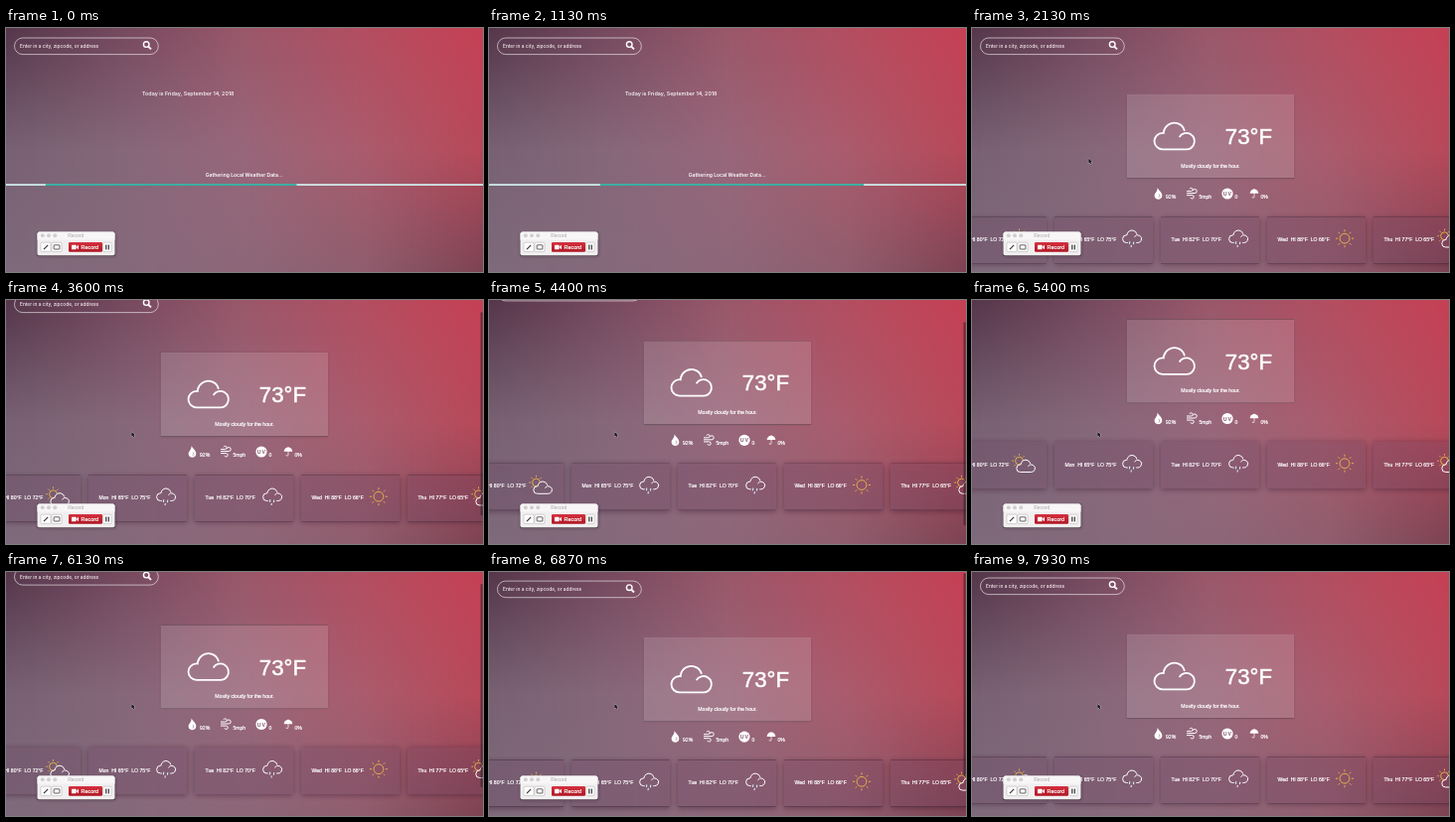
An HTML page with a canvas for the animation above (8 s loop, 480 by 246 pixels).

```html
<!DOCTYPE html>
<html lang="en">
<head>
<meta charset="utf-8">
<title>Local weather</title>
<style>
  html, body { margin: 0; width: 100%; height: 100%; overflow: hidden; background: #7b5a6c; }
  canvas { display: block; width: 480px; height: 246px; }
</style>
</head>
<body>
<canvas id="stage"></canvas>
<script>
const W = 480, H = 246, LOOP = 8000, LOADED = 1330;
const SANS = '"Liberation Sans", Arial, sans-serif';
const INTER = 'Inter, sans-serif';
const canvas = document.getElementById('stage');
const c = canvas.getContext('2d');
const dpr = window.devicePixelRatio || 1;
canvas.width = W * dpr;
canvas.height = H * dpr;

const days = [
  ['Sun', 80, 72, 'partly'],
  ['Mon', 65, 75, 'rain'],
  ['Tue', 82, 70, 'rain'],
  ['Wed', 88, 66, 'sun'],
  ['Thu', 77, 65, 'partly']
];

// backdrop colours from left to right, at the top, middle and bottom
const ramps = [
  ['#55364b', '#76495e', '#9a576a', '#b34d60', '#c64054'],
  ['#776173', '#86677a', '#98667a', '#aa5b6c', '#b74859'],
  ['#7d6a7b', '#85697b', '#8c6778', '#8f5d6e', '#7c4353']
];

// time, page scroll
const scrollKeys = [[0, 0], [2470, 0], [3200, 13], [3600, 14], [4130, 25], [4400, 25.7], [4800, 47.5],
  [5440, 47.5], [6130, 13.5], [6640, 0.8], [6800, 0.8], [7500, 4], [LOOP, 4]];
const barKeys = [[0, 0], [2470, 0], [2600, 1], [5100, 1], [5320, 0], [5430, 0], [5500, 1], [7640, 1], [7900, 0], [LOOP, 0]];

const clamp = v => Math.max(0, Math.min(1, v));
const smooth = v => v * v * (3 - 2 * v);

function track(keys, t) {
  for (let i = 1; i < keys.length; i++) {
    const [t0, a] = keys[i - 1], [t1, b] = keys[i];
    if (t <= t1) return a + (b - a) * smooth(clamp((t - t0) / (t1 - t0)));
  }
  return keys[keys.length - 1][1];
}

function bezier(x, x1, y1, x2, y2) {
  const at = (s, a, b) => 3 * (1 - s) * (1 - s) * s * a + 3 * (1 - s) * s * s * b + s * s * s;
  let lo = 0, hi = 1;
  for (let i = 0; i < 24; i++) {
    const mid = (lo + hi) / 2;
    if (at(mid, x1, x2) < x) lo = mid; else hi = mid;
  }
  return at(lo, y1, y2);
}

function text(str, x, y, size, { font = SANS, color = '#fff', align = 'left', weight = 400, bold = 0 } = {}) {
  c.font = `${weight} ${size}px ${font}`;
  c.textAlign = align;
  c.fillStyle = color;
  c.fillText(str, x, y);
  if (bold) {
    c.strokeStyle = color;
    c.lineWidth = bold;
    c.strokeText(str, x, y);
  }
}

function line(color, width, ...pts) {
  c.strokeStyle = color;
  c.lineWidth = width;
  c.beginPath();
  pts.forEach(([x, y], i) => i ? c.lineTo(x, y) : c.moveTo(x, y));
  c.stroke();
}

function disc(x, y, r, color) {
  c.fillStyle = color;
  c.beginPath();
  c.arc(x, y, r, 0, 7);
  c.fill();
}

function box(x, y, w, h, r, fill, stroke, width = 0.7) {
  c.beginPath();
  c.roundRect(x, y, w, h, r);
  if (fill) { c.fillStyle = fill; c.fill(); }
  if (stroke) { c.strokeStyle = stroke; c.lineWidth = width; c.stroke(); }
}

// shadow around a translucent box, kept outside it
function shadow(x, y, w, h, blur, color, dy = 1) {
  c.save();
  c.beginPath();
  c.rect(-60, -60, W + 120, H + 120);
  c.rect(x, y, w, h);
  c.clip('evenodd');
  c.shadowColor = color;
  c.shadowBlur = blur * dpr;
  c.shadowOffsetY = dy * dpr;
  c.fillStyle = '#000';
  c.fillRect(x, y, w, h);
  c.restore();
}

function at(x, y, scale, draw) {
  c.save();
  c.translate(x, y);
  c.scale(scale, scale);
  draw();
  c.restore();
}

function paintBackdrop() {
  const img = document.createElement('canvas');
  img.width = W;
  img.height = H;
  const g = img.getContext('2d');
  const channel = (hex, k) => parseInt(hex.slice(1 + 2 * k, 3 + 2 * k), 16);
  const pick = (ramp, u) => {
    const p = u * (ramp.length - 1), i = Math.min(ramp.length - 2, Math.floor(p));
    const rgb = [0, 1, 2].map(k => channel(ramp[i], k) + (channel(ramp[i + 1], k) - channel(ramp[i], k)) * (p - i));
    return `rgb(${rgb.map(Math.round)})`;
  };
  for (let x = 0; x < W; x++) {
    const col = g.createLinearGradient(0, 0, 0, H);
    ramps.forEach((ramp, i) => col.addColorStop(i / 2, pick(ramp, x / (W - 1))));
    g.fillStyle = col;
    g.fillRect(x, 0, 1, H);
  }
  return img;
}
const backdrop = paintBackdrop();

function cloudPath(inset = 0) {
  const rad = d => d * Math.PI / 180;
  c.arc(-11.8, 4.8, 8.2, rad(90), rad(278));
  c.arc(0, -2.8, 10.8, rad(192), rad(345));
  if (inset) c.moveTo(12.2 + 8.2 * Math.cos(rad(255 - inset)), 4.8 + 8.2 * Math.sin(rad(255 - inset)));
  c.arc(12.2, 4.8, 8.2, rad(255 - inset), rad(90));
}

function cloud(x, y, scale, width, open) {
  at(x, y, scale, () => {
    c.beginPath();
    cloudPath(45);
    if (open) {
      c.lineTo(9, 13);
      c.moveTo(-9, 13);
    }
    c.lineTo(-11.8, 13);
    c.strokeStyle = '#fff';
    c.lineWidth = width / scale;
    c.stroke();
  });
}

function sun(x, y, r) {
  const color = '#ecb94a';
  c.strokeStyle = color;
  c.lineWidth = 0.9;
  c.beginPath();
  c.arc(x, y, r, 0, 7);
  c.stroke();
  for (let i = 0; i < 8; i++) {
    const a = i * Math.PI / 4, dx = Math.cos(a), dy = Math.sin(a);
    line(color, 0.9, [x + dx * r * 1.4, y + dy * r * 1.4], [x + dx * r * 1.85, y + dy * r * 1.85]);
  }
}

function dayIcon(kind, x, y) {
  if (kind === 'sun') return sun(x, y, 4.9);
  if (kind === 'partly') {
    c.save();
    c.beginPath();
    c.rect(x - 20, y - 20, 40, 40);
    at(x + 2, y + 2.8, 0.46, () => {
      c.moveTo(-11.8, 13);
      cloudPath();
      c.closePath();
    });
    c.clip('evenodd');
    sun(x - 4.5, y - 2.5, 3.9);
    c.restore();
    return cloud(x + 2, y + 2.8, 0.46, 1);
  }
  cloud(x, y - 1.8, 0.47, 1, true);
  line('#d3ecf7', 1.1, [x - 2.2, y + 3], [x - 2.6, y + 5.6]);
  line('#d3ecf7', 1.1, [x + 1.8, y + 3.4], [x + 1.4, y + 6]);
  line('#d3ecf7', 1.1, [x - 0.6, y + 6.6], [x - 1, y + 8.8]);
}

function search() {
  box(8.5, 10, 144.8, 16.6, 8.3, null, 'rgba(255,255,255,.72)', 0.8);
  text('Enter in a city, zipcode, or address', 14, 20, 4.8, { font: INTER, weight: 500, color: '#f8eef1' });
  c.strokeStyle = '#fff';
  c.lineWidth = 1.4;
  c.beginPath();
  c.arc(141.2, 16.6, 2.8, 0, 7);
  c.stroke();
  line('#fff', 1.9, [143.4, 18.8], [146, 21.4]);
}

function loading(t) {
  text('Today is Friday, September 14, 2018', 137, 68, 5.4, { font: INTER, weight: 500 });
  text('Gathering Local Weather Data...', 239.7, 149.8, 5.05, { font: INTER, weight: 600, align: 'center' });
  const y = 157.2, h = 1.7;
  c.fillStyle = '#d3f1f0';
  c.fillRect(0, y, W, h);
  const seg = (l, r) => {
    c.fillStyle = '#26a69a';
    c.fillRect(l * W, y, Math.max(0, r - l) * W, h);
  };
  const p = bezier(clamp((t + 361) / 1260), 0.65, 0.815, 0.735, 0.395);
  seg(-0.35 + 1.35 * p, 1.9 * p);
  const q = bezier(clamp((t - 789) / 1260), 0.165, 0.84, 0.44, 1);
  seg(-2 + 3.07 * q, 1.08 * q);
}

function details() {
  // drop
  c.fillStyle = '#fff';
  c.beginPath();
  c.moveTo(186.6, 161);
  c.bezierCurveTo(188, 164, 191.3, 165.5, 191.3, 169);
  c.bezierCurveTo(191.3, 174, 183.6, 174, 183.6, 169);
  c.bezierCurveTo(183.6, 166.5, 186.8, 165, 186.6, 161);
  c.fill();
  line('rgba(130,90,110,.8)', 0.7, [188, 167.5], [189, 169.5], [187.6, 171]);
  // wind
  [[216, 164.5, 220.5, 1.6], [216, 166.5, 224.2, 2], [216, 168.6, 221.5, -1.7]].forEach(([x, y, end, r]) => {
    c.strokeStyle = '#fff';
    c.lineWidth = 1;
    c.beginPath();
    c.moveTo(x, y);
    c.lineTo(end, y);
    if (r > 0) c.arc(end, y - r, r, Math.PI / 2, -Math.PI * 0.9, true);
    else c.arc(end, y - r, -r, -Math.PI / 2, Math.PI * 0.9);
    c.stroke();
  });
  // uv
  disc(257, 167, 5.6, '#fff');
  text('U', 254.7, 169, 5.2, { align: 'center', weight: 700, color: '#83576c' });
  text('V', 259.2, 169, 5.2, { align: 'center', weight: 700, color: '#83576c' });
  // umbrella
  c.fillStyle = '#fff';
  c.beginPath();
  c.arc(284, 166.8, 4.3, Math.PI, 0);
  c.fill();
  c.strokeStyle = '#fff';
  c.lineWidth = 0.7;
  c.beginPath();
  c.moveTo(284, 162);
  c.lineTo(284, 170.2);
  c.arc(283, 170.2, 1, 0, Math.PI);
  c.stroke();

  const label = (str, x) => text(str, x, 172.2, 5.1, { bold: 0.2 });
  label('92%', 195);
  label('5mph', 228.4);
  label('0', 264.6);
  label('0%', 290.5);
}

function weather() {
  shadow(156, 67, 168, 84.3, 3, 'rgba(60,25,45,.22)', 0.5);
  box(156, 67, 168, 84.3, 0.8, 'rgba(255,255,255,.13)', 'rgba(255,255,255,.08)', 0.6);
  cloud(203.5, 109.3, 1, 1.8);
  text('73°F', 278.4, 117.2, 22.2, { align: 'center', bold: 0.5 });
  text('Mostly cloudy for the hour.', 240, 140.6, 5.08, { align: 'center', bold: 0.2 });
  details();
  days.forEach(([name, hi, lo, kind], i) => {
    const x = -24 + i * 107;
    shadow(x, 190.6, 99, 46.8, 6, 'rgba(62,26,50,.55)');
    box(x, 190.6, 99, 46.8, 0.8, 'rgba(104,62,92,.26)');
    text(`${name}  HI ${hi}°F  LO ${lo}°F`, x + 10.5, 215.2, 5.08, { bold: 0.2 });
    dayIcon(kind, x + (kind === 'partly' ? 76 : 78), 212.2);
  });
}

function recorder() {
  shadow(31.5, 205.5, 78, 23.8, 4, 'rgba(20,8,16,.35)');
  box(31.5, 205.5, 78, 23.8, 2, '#f1eff0');
  box(31.5, 205.5, 78, 8, [2, 2, 0, 0], '#f8f6f7');
  [36.8, 43, 49.3].forEach(x => disc(x, 209.3, 2, '#d2cfd1'));
  text('Record', 70.2, 211, 5, { align: 'center', color: '#a9a5a8' });
  [[35, 10], [46, 10], [98, 8]].forEach(([x, w]) => box(x, 216.2, w, 9.4, 1, '#fff', '#b9b4b7', 0.6));
  line('#3a3739', 1.2, [38, 223.2], [42.2, 218.8]);
  box(48.2, 218.8, 5.7, 4.2, 0.3, null, '#3a3739', 0.8);
  line('#333', 1.2, [100.8, 218.4], [100.8, 223.4]);
  line('#333', 1.2, [103.3, 218.4], [103.3, 223.4]);
  const g = c.createLinearGradient(0, 216, 0, 226);
  g.addColorStop(0, '#d5323f');
  g.addColorStop(1, '#ad1522');
  box(63, 216, 34, 9.8, 1.2, g);
  box(66, 218.7, 4.6, 4.6, 0.6, '#fff');
  c.beginPath();
  c.moveTo(70.4, 221);
  c.lineTo(73, 218.8);
  c.lineTo(73, 223.2);
  c.fill();
  text('Record', 75.6, 222.8, 5.4, { bold: 0.2 });
}

function cursor(t) {
  const p = smooth(clamp((t - 2470) / 500));
  at(117.4 + 9 * p, 131.6 + 1.3 * p, 1, () => {
    c.beginPath();
    [[0, 0], [0, 4.8], [1.1, 3.9], [1.9, 5.5], [2.7, 5.1], [2, 3.6], [3.4, 3.5]]
      .forEach(([x, y], i) => i ? c.lineTo(x, y) : c.moveTo(x, y));
    c.closePath();
    c.strokeStyle = 'rgba(255,255,255,.65)';
    c.lineWidth = 0.7;
    c.stroke();
    c.fillStyle = '#111';
    c.fill();
  });
}

function draw(t) {
  c.setTransform(dpr, 0, 0, dpr, 0, 0);
  c.drawImage(backdrop, 0, 0, W, H);
  const scroll = track(scrollKeys, t);
  c.save();
  c.translate(0, -scroll);
  search();
  if (t < LOADED) loading(t); else weather();
  c.restore();
  const bar = track(barKeys, t);
  if (bar > 0) box(477.6, scroll * 0.84 + 0.6, 2, 205, 1, `rgba(50,28,40,${0.62 * bar})`);
  if (t >= LOADED) cursor(t);
  recorder();
}

const start = performance.now();
function tick() {
  draw((performance.now() - start) % LOOP);
  requestAnimationFrame(tick);
}
tick();
</script>
</body>
</html>
```
